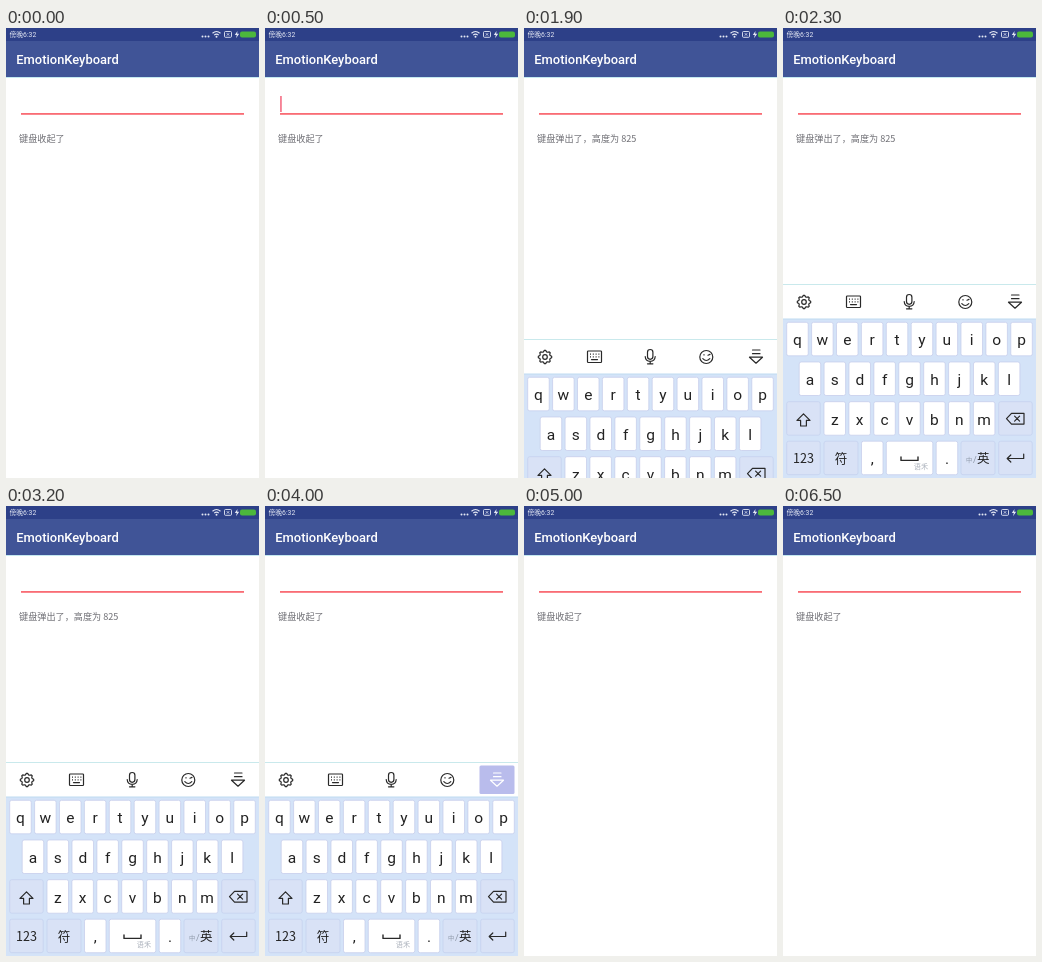
Recreate the animation shown at these times as an HTML page. Size 253x450 px, loop 6900 ms.

```html
<!DOCTYPE html>
<html lang="zh-CN">
<head>
<meta charset="utf-8">
<title>EmotionKeyboard</title>
<style>
html, body { margin: 0; width: 100%; height: 100%; overflow: hidden; background: #fff; }
svg { display: block; width: 100%; height: 100%; }
text { font-family: Roboto, "Noto Sans CJK SC", "Noto Sans CJK", sans-serif; }
.mid { text-anchor: middle; }
.line { fill: none; stroke: #292929; stroke-width: 1.2; stroke-linejoin: round; stroke-linecap: round; }
.key { fill: #fff; stroke: #c3cbea; stroke-width: .7; }
.key.special { fill: #d9e2f6; stroke: #c3d0ee; }
.letter { font-size: 15.5px; fill: #222; }
.letter.special { font: 12.6px "Noto Sans CJK SC", "Noto Sans CJK", sans-serif; }
.note { font-family: "Noto Sans CJK SC", "Noto Sans CJK", sans-serif; font-size: 9.15px; fill: #6e6e74; }
</style>
</head>
<body>
<svg viewBox="0 0 253 450">
  <rect width="253" height="450" fill="#fff"/>
  <rect y="13" width="253" height="36" fill="#405497"/>
  <rect width="253" height="13" fill="#2d4088"/>
  <rect y="49" width="253" height="1" fill="#c4e8f0"/>
  <text x="3.5" y="9.2" font-size="6.8" fill="#e4e8f4">傍晚6:32</text>
  <g fill="#e4e8f4">
    <circle cx="196.5" cy="8.4" r="1"/><circle cx="199.5" cy="8.4" r="1"/><circle cx="202.5" cy="8.4" r="1"/>
    <path d="M231.5 3 L228.8 7 H230.8 L230 10.2 L233.2 5.8 H231.2Z"/>
    <circle cx="210.5" cy="8.8" r="1"/>
  </g>
  <g fill="none" stroke="#e4e8f4">
    <path d="M206.5 5.2 Q210.5 1.8 214.5 5.2 M208.2 7.1 Q210.5 5.2 212.8 7.1" stroke-width="1.2"/>
    <rect x="218.5" y="3.5" width="7" height="5.8" rx="1" stroke-width=".9"/>
    <path d="M220.8 5.2 l2.4 2.4 m0 -2.4 l-2.4 2.4" stroke-width=".8"/>
  </g>
  <rect x="234" y="3.4" width="16" height="6" rx="2" fill="#4cb83c"/>
  <text x="10.3" y="36" font-size="12.92" font-weight="500" fill="#fff">EmotionKeyboard</text>

  <rect x="15" y="85" width="223" height="1.8" fill="#f96c74"/>
  <rect id="caret" x="15.2" y="68" width="1.5" height="16" fill="#f4647c"/>
  <text id="hidden" class="note" x="13" y="113.7">键盘收起了</text>
  <text id="shown" class="note" x="13" y="113.7">键盘弹出了，高度为 825</text>

  <g id="keyboard">
    <rect y="256" width="253" height="194" fill="#fff"/>
    <rect y="256" width="253" height="1" fill="#c9e9ec"/>
    <rect y="291" width="253" height="159" fill="#d4e3f8"/>
    <rect y="290.5" width="253" height="1" fill="#c0dcf2"/>
    <g class="line">
      <path id="gear"/>
      <circle cx="21" cy="274" r="2.3"/>
      <rect x="63.5" y="268" width="14" height="11.5" rx=".8"/>
      <path d="M66 271.2h9.5 M66 273.8h9.5" stroke-dasharray="1 1.8" stroke-linecap="butt"/>
      <path d="M67.5 276.6h6"/>
      <rect x="123.5" y="266.5" width="5.4" height="9.8" rx="2.7"/>
      <path d="M121.2 273.5 Q121.5 278.3 126.2 278.3 Q130.9 278.3 131.2 273.5 M126.2 278.3v2.5 M123.5 280.8h5.4"/>
      <circle cx="182.3" cy="274" r="6.5"/>
      <path d="M179.8 271.8h.4 M184 272.2l2 -.8 M178.8 275.6 Q182.3 279.4 185.8 275.6"/>
    </g>
    <rect id="press" x="214.5" y="259.5" width="35" height="28.5" rx="1.5" fill="#b9bcec"/>
    <path id="fold" class="line" d="M228.5 267h7.5 M228.5 270.7h7.5 M225.5 274.2h13l-6.5 6z"/>
    <path id="foldPress" class="line" style="stroke:#fff" d="M228.5 267h7.5 M228.5 270.7h7.5 M225.5 274.2h13l-6.5 6z"/>
    <g id="keys"></g>
    <g class="line">
      <path d="M20.5 385.8 L27 392.4 H23.4 V398 H17.6 V392.4 H14Z"/>
      <path d="M228.5 385.3h12.5v10.8h-12.5l-5 -5.4z M231.6 388.2l5 5 m0 -5l-5 5"/>
      <path d="M240.7 426v4.5h-16.5 m3.6 -3.5l-3.6 3.5l3.6 3.5"/>
      <path d="M118 429v3.4h17v-3.4" stroke-width="1.4"/>
    </g>
    <text class="mid" x="138" y="441" font-size="7.2" fill="#adb3bd">语禾</text>
    <text x="183" y="433.5" font-size="6.2" fill="#8b95a5">中</text>
    <text x="190" y="434.5" font-size="9" fill="#8b95a5">/</text>
    <text x="194" y="434.5" font-size="12.5" fill="#222">英</text>
  </g>
</svg>
<script>
const LOOP = 6900;
const $ = id => document.getElementById(id);
const keys = $("keys");

function add(tag, attrs, label = "") {
  const el = document.createElementNS("http://www.w3.org/2000/svg", tag);
  for (const name in attrs) el.setAttribute(name, attrs[name]);
  el.textContent = label;
  keys.append(el);
}

function key(x, y, width, label = "", special = false) {
  const kind = special ? " special" : "";
  add("rect", { x, y, width, height: 33.5, rx: 2, class: "key" + kind });
  if (label) add("text", {
    x: x + width / 2, y: y + (special ? 21.4 : 22.8), class: "mid letter" + kind
  }, label);
}

function row(letters, x, y) {
  [...letters].forEach((letter, i) => key(x + i * 24.9, y, 21.5, letter));
}

row("qwertyuiop", 3.7, 294.3);
row("asdfghjkl", 16.2, 334);
row("zxcvbnm", 41, 373.7);
key(3.7, 373.7, 33.5, "", true);
key(215.7, 373.7, 33.5, "", true);
key(3.7, 413.2, 33.5, "123", true);
key(41, 413.2, 34, "符", true);
key(78.5, 413.2, 21.5, ",");
key(103.3, 413.2, 46.5);
key(153.2, 413.2, 21.5, ".");
key(178, 413.2, 34, "", true);
key(215.7, 413.2, 33.5, "", true);

// Eight-toothed outline around the settings hub
const teeth = Array.from({ length: 32 }, (_, i) => {
  const angle = (i - 0.5) * Math.PI / 16;
  const radius = i % 4 < 2 ? 6.7 : 5.4;
  return `${21 + radius * Math.cos(angle)} ${274 + radius * Math.sin(angle)}`;
});
$("gear").setAttribute("d", `M${teeth.join("L")}Z`);

// Each step is [start in ms, value], held until the next one
function play(id, property, steps) {
  const frames = [...steps, [LOOP, steps.at(-1)[1]]].map(([ms, value]) =>
    ({ offset: ms / LOOP, [property]: value, easing: "step-end" }));
  const animation = $(id).animate(frames, { duration: LOOP, iterations: Infinity });
  animation.startTime = document.timeline.currentTime ?? 0;
}

const toggle = (id, first, times) =>
  play(id, "opacity", [0, ...times].map((ms, i) => [ms, (first + i) % 2]));

toggle("caret", 0, [500, 1000, 1500, 1900, 2400, 2900, 3400, 3900, 4500, 5000, 5400, 5600, 5800, 6500]);
toggle("shown", 0, [1900, 4000]);
toggle("hidden", 1, [1900, 4000]);
toggle("press", 0, [3900, 4300]);
toggle("foldPress", 0, [3900, 4300]);
toggle("fold", 1, [3900, 4300]);
play("keyboard", "transform", [
  [0, 200], [1900, 55], [2000, 12], [2100, 0], [4100, 42], [4200, 138], [4300, 200]
].map(([ms, y]) => [ms, `translateY(${y}px)`]));
</script>
</body>
</html>
```
